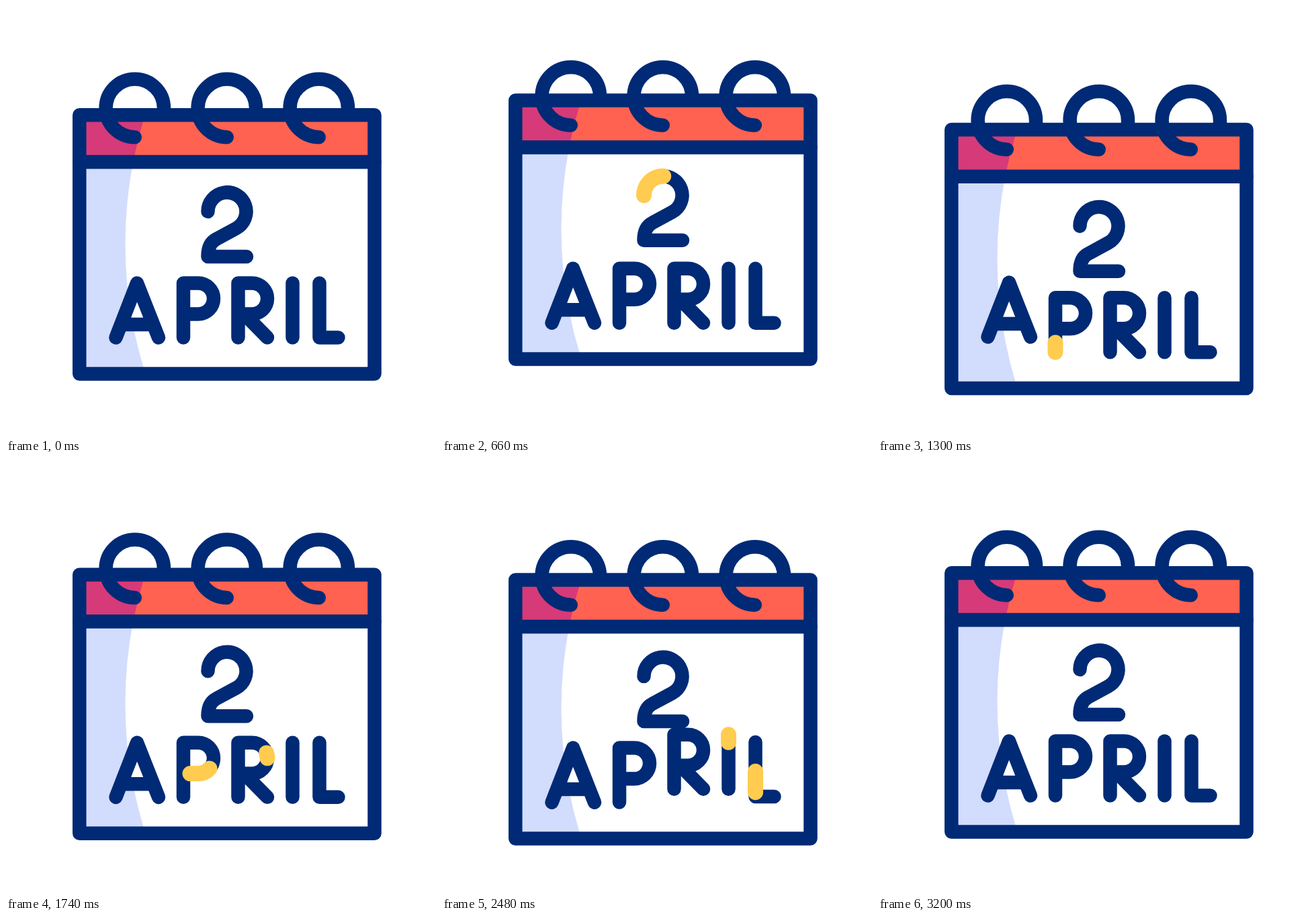
Write an HTML page with a canvas that moves like this. It is 640x640 px and loops after 3420 ms.

```html
<!DOCTYPE html>
<html lang="en">
<head>
<meta charset="utf-8">
<title>2 April</title>
<style>
html, body { margin: 0; width: 100%; height: 100%; overflow: hidden; background: #fff; }
canvas { display: block; width: 100vmin; height: 100vmin; }
</style>
</head>
<body>
<canvas id="stage" width="640" height="640"></canvas>
<script>
const ctx = document.getElementById('stage').getContext('2d');
const NAVY = '#002a75', RED = '#ff6250', PINK = '#d63a78', PALE = '#d2dcfd', GOLD = '#ffcc50';
const LOOP = 3420, START = 200, STEP = 600, LINE = 20.5;

// vertical swing keys, one every STEP ms
const BODY = [0, -25, 25, -12.5, 12.5, 0];
const RINGS = [0, -20.3, 21, -7.5, 16.8, 0];

const clamp = x => Math.min(1, Math.max(0, x));
const ease = x => (1 - Math.cos(Math.PI * clamp(x))) / 2;

function swing(keys, t) {
  const p = clamp((t - START) / (STEP * 5)) * 5;
  const i = Math.min(4, Math.floor(p));
  return keys[i] + (keys[i + 1] - keys[i]) * ease(p - i);
}

function pathLength(d) {
  const p = document.createElementNS('http://www.w3.org/2000/svg', 'path');
  p.setAttribute('d', d);
  return p.getTotalLength();
}

// shape: letter strokes, trace: route of the gold line, from/run: its timing, hop: jump time
function glyph(shape, trace, from, run, hop) {
  return { shape: new Path2D(shape), trace: new Path2D(trace), size: pathLength(trace), from, run, hop };
}

const P = 'M264 493.5V412.5H286A23 23 0 0 1 286 458.5H274';
const A = 'M163.5 493.5L195 412.5L227 493.5';
const L = 'M494.5 493.5H466.5V412.5';
const I = 'M426.5 493.5V412.5';
const glyphs = [
  glyph('M300.5 306A28.5 28.5 0 1 1 342.5 331L313 347C305 351 300.5 360 300.5 373H358',
    'M358 373H300.5C300.5 360 305 351 313 347L342.5 331A28.5 28.5 0 1 0 300.5 306', 200, 400, 620),
  glyph(A + 'M172 474H218', A, 735, 400, 1140),
  glyph(P + 'H264', P, 1270, 400, 1740),
  glyph('M345.5 493.5V412.5H366A23 23 0 0 1 366 458.5H345.5M357 461L389 493.5',
    'M387.6 427.6A23 23 0 0 1 366 458.5L361 465L389 493.5', 1705, 400, 2220),
  glyph(I, I, 2170, 200, 2340),
  glyph(L, L, 2240, 400, 2400)
];

function hopAt(g, t) {
  const p = (t - g.hop) / 200;
  return -25 * (ease(p) - ease(p - 1));
}

function drawGlyph(g, t) {
  ctx.save();
  ctx.translate(0, hopAt(g, t));
  ctx.strokeStyle = NAVY;
  ctx.lineWidth = LINE;
  ctx.stroke(g.shape);
  const head = clamp((t - g.from) / g.run) * g.size;
  const tail = clamp((t - g.from - 100) / (g.run + 45)) * g.size;
  if (head - tail > 0.1) {
    ctx.strokeStyle = GOLD;
    ctx.lineWidth = 23;
    ctx.setLineDash([head - tail, 2000]);
    ctx.lineDashOffset = -tail;
    ctx.stroke(g.trace);
  }
  ctx.restore();
}

function panel(y, h, fill, shade) {
  const x = 109.3, w = 439.2;
  ctx.save();
  ctx.beginPath();
  ctx.rect(x, y, w, h);
  ctx.clip();
  ctx.fillStyle = shade;
  ctx.fillRect(x, y, w, h);
  ctx.fillStyle = fill;
  ctx.beginPath();
  ctx.arc(815.5, 354, 638, 0, Math.PI * 2);
  ctx.fill();
  ctx.restore();
  ctx.strokeRect(x, y, w, h);
}

function drawRing(x) {
  ctx.beginPath();
  ctx.moveTo(x + 43.2, 156);
  ctx.arc(x, 152, 43.2, 0, Math.PI / 2, true);
  ctx.stroke();
}

function draw(t) {
  ctx.fillStyle = '#fff';
  ctx.fillRect(0, 0, 640, 640);
  ctx.lineCap = ctx.lineJoin = 'round';
  ctx.strokeStyle = NAVY;
  ctx.lineWidth = LINE;

  ctx.save();
  ctx.translate(0, swing(BODY, t));
  panel(232, 315.4, '#fff', PALE);
  panel(162.3, 69.7, RED, PINK);
  glyphs.forEach(g => drawGlyph(g, t));
  ctx.restore();

  ctx.save();
  ctx.translate(0, swing(RINGS, t));
  [191.8, 328.8, 465.8].forEach(drawRing);
  ctx.restore();
}

const begin = performance.now();
function tick() {
  const t = Math.max(0, performance.now() - begin) % LOOP;
  draw(Math.floor(t / 20) * 20);
  requestAnimationFrame(tick);
}
tick();
</script>
</body>
</html>
```
